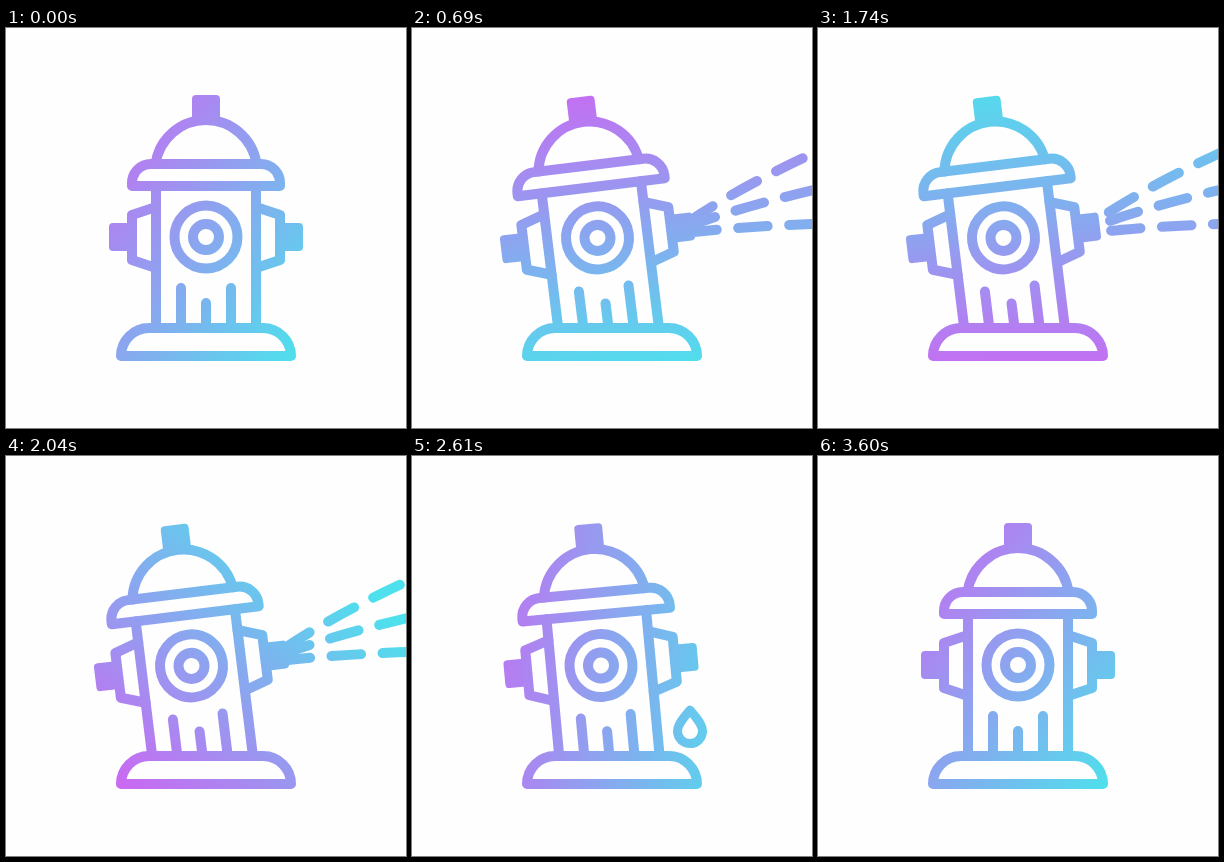
Animation of 400 by 400 pixels, one loop 5630 ms. Source, as an HTML page:

```html
<!DOCTYPE html>
<html lang="en">
<head>
<meta charset="utf-8">
<title>Fire hydrant</title>
<style>
  html, body { margin: 0; width: 100%; height: 100%; overflow: hidden; background: #fefefe; }
  svg { display: block; width: 100%; height: 100%; }

  .line { fill: none; stroke: #fff; stroke-width: 10; stroke-linecap: round; stroke-linejoin: round; }
  .solid { fill: #fff; stroke: none; }

  .spin, .lean, .jet, .drop { animation: 5630ms linear infinite; }

  .spin { transform-origin: 200px 200px; animation-name: spin; }
  @keyframes spin {
    0% { transform: rotate(36deg); animation-timing-function: cubic-bezier(.33, 0, .4, 1); }
    63.94%, 100% { transform: rotate(396deg); }
  }

  .lean { transform-origin: 200px 328px; animation-name: lean; }
  @keyframes lean {
    0% { transform: rotate(0deg); animation-timing-function: ease-in-out; }
    5.33% { transform: rotate(-8.3deg); animation-timing-function: ease-in-out; }
    8.5% { transform: rotate(-7deg); }
    43.2% { transform: rotate(-7deg); animation-timing-function: ease-in-out; }
    44.8% { transform: rotate(-7.5deg); animation-timing-function: ease-in-out; }
    49%, 100% { transform: rotate(0deg); }
  }

  /* twelve dashes, then a gap long enough to hide the repeat */
  .jet {
    stroke-dasharray: 29.5 21.5 29.5 21.5 29.5 21.5 29.5 21.5 29.5 21.5 29.5 21.5
                      29.5 21.5 29.5 21.5 29.5 21.5 29.5 21.5 29.5 21.5 29.5 2000;
    animation-name: jet;
  }
  @keyframes jet {
    0%, 2.13% { stroke-dashoffset: 601px; animation-timing-function: cubic-bezier(.333, .37, .667, .704); }
    30.9% { stroke-dashoffset: 81px; animation-timing-function: cubic-bezier(.333, .365, .667, .698); }
    50.62%, 100% { stroke-dashoffset: var(--end); }
  }

  .drop { stroke-width: 9; transform-origin: 278px 212px; animation-name: drop; }
  @keyframes drop {
    0%, 37.8% { transform: scale(0); opacity: 0; }
    37.9% { transform: scale(0); opacity: 1; animation-timing-function: ease-out; }
    41%, 42.2% { transform: none; opacity: 1; animation-timing-function: ease-in; }
    47% { transform: translateY(48px); opacity: 1; }
    49%, 100% { transform: translateY(64px) scale(0); opacity: 0; }
  }
</style>
</head>
<body>
<svg viewBox="0 0 400 400">
  <defs>
    <linearGradient id="tint" gradientUnits="userSpaceOnUse" x1="50" y1="0" x2="350" y2="0">
      <stop offset="0" stop-color="#c86af2"/>
      <stop offset="1" stop-color="#4ee0ec"/>
    </linearGradient>

    <clipPath id="above"><rect width="400" height="300"/></clipPath>

    <g id="port">
      <path d="M150 240 L126 232 V187 L150 179"/>
      <rect class="solid" x="103" y="195" width="24" height="28" rx="4"/>
    </g>

    <mask id="art" maskUnits="userSpaceOnUse" x="0" y="0" width="400" height="400">
      <g class="line">
        <path d="M115 328 A28 28 0 0 1 143 300 H257 A28 28 0 0 1 285 328 Z"/>

        <g clip-path="url(#above)">
          <g class="lean">
            <rect class="solid" x="186" y="67" width="28" height="28" rx="4"/>
            <path d="M149.5 136 A51 51 0 0 1 250.5 136"/>
            <path d="M126 158 V155 A19 19 0 0 1 145 136 H255 A19 19 0 0 1 274 155 V158 Z"/>
            <path d="M150 158 V312 M250 158 V312"/>
            <use href="#port"/>
            <use href="#port" transform="matrix(-1 0 0 1 400 0)"/>
            <circle cx="200" cy="209" r="31.5"/>
            <circle cx="200" cy="209" r="13"/>
            <path d="M175 260 V312 M200 275 V312 M225 260 V312"/>
          </g>
        </g>

        <path class="jet" style="--end: -222px" d="M273 196 Q340 150 450 104"/>
        <path class="jet" style="--end: -212px" d="M272 200 Q340 174 460 149"/>
        <path class="jet" style="--end: -208px" d="M272 205 Q340 197 460 194"/>

        <path class="drop" d="M278 216 C273 222 265.5 230 265.5 237 A12.5 12.5 0 0 0 290.5 237 C290.5 230 283 222 278 216 Z"/>
      </g>
    </mask>
  </defs>

  <g mask="url(#art)">
    <rect class="spin" x="-200" y="-200" width="800" height="800" fill="url(#tint)"/>
  </g>
</svg>
</body>
</html>
```
